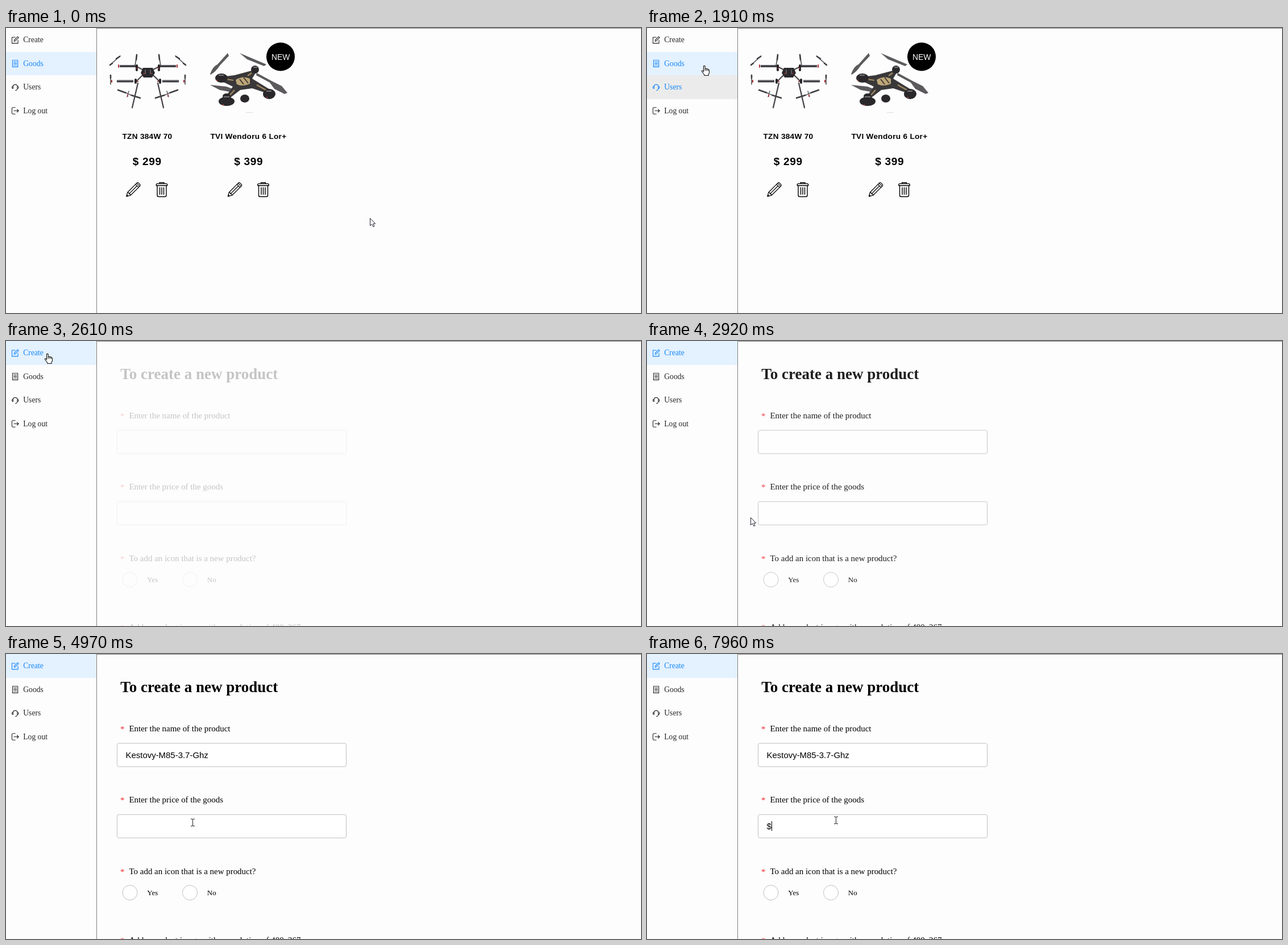
These frames come from a looping animation (1117x501 px, 8 s). An HTML page:

```html
<!DOCTYPE html>
<html lang="en">
<head>
<meta charset="utf-8">
<title>Shop admin</title>
<style>
  html, body { margin: 0; width: 100%; height: 100%; overflow: hidden; background: #fdfdfd; }
  svg { display: block; }
  .serif { font-family: "Liberation Serif", "Times New Roman", serif; }
  .sans { font-family: "Liberation Sans", Arial, sans-serif; }
  .line { fill: none; stroke: currentColor; stroke-linejoin: round; stroke-linecap: round; }
  .field { fill: #fff; stroke: #bfbfbf; }
</style>
</head>
<body>
<svg id="stage" width="1117" height="501" viewBox="0 0 1117 501">
  <defs>
    <g id="pencil" class="line" stroke-width="1.2">
      <path d="M1 26 2.8 19 19.200 2.400Q20.600 1 22 2.400L24.600 5Q26 6.400 24.600 7.800L8 24.200ZM2.800 19Q5.500 18.800 5.400 21.600 8.200 21.500 8 24.200M16.800 4.800 22.200 10.200M18.800 2.800 24.200 8.200M5.400 21.600 19.500 7.500"/>
      <path d="M1 26 1.700 23.300 3.700 25.300Z" fill="currentColor"/>
    </g>
    <path id="trash" class="line" stroke-width="1.4" d="M.8 4.600Q.8 2.600 3 2.600H18Q20.200 2.600 20.200 4.600V6H.8ZM6.500 2.600V.8H14.500V2.600M2.500 6V23Q2.500 25.500 5 25.500H16Q18.500 25.500 18.500 23V6M7 9.500V21.500M10.500 9.500V21.500M14 9.500V21.500"/>
  </defs>

  <g id="menu" class="serif" font-size="13.6"></g>
  <path d="M159.500 0V501M159 .5H1117" fill="none" stroke="#808080"/>

  <g id="goods" class="sans">
    <g id="hexaDrone" fill="none" stroke-linecap="round">
      <g id="droneHalf">
        <path d="M230 68 244 75M230 93 240 83" stroke="#4a484c" stroke-width="2.200"/>
        <path d="M200 67H228M195 93.500H224" stroke="#3a3a40" stroke-width="4" stroke-linecap="butt"/>
        <path d="M200 66H228M195 92.500H224" stroke="#707076"/>
        <path d="M230 48 227 66M201 49 192 57 183 65M184 83V99" stroke="#4d4b50" stroke-width="1.600"/>
        <path d="M230 47 229 56M200 50 194 54M187 62 183 65M184 83V88M197 109 211 114M220 118 236 123" stroke="#3f3e43" stroke-width="2.600"/>
        <path d="M232 97 222 140" stroke="#47454a" stroke-width="2.300"/>
        <path d="M211 114 220 118M213 121 216 111" stroke="#66636a" stroke-width="1.500"/>
        <path d="M230 66V74M228 91V96" stroke="#232326" stroke-width="4"/>
        <path d="M198 65V69M230 71H231M186 92V95M214 118V120M231 94H232" stroke="#a8343a" stroke-width="2"/>
      </g>
      <use href="#droneHalf" transform="matrix(-1 0 0 1 499 0)"/>
      <path d="M241 70H258L262 79 257 87H242L237 79Z" fill="#29292d"/>
      <path d="M245 74V80M254 74V80" stroke="#5d5d64" stroke-width="2"/>
      <path d="M242 80H244M255 80H257" stroke="#a8343a" stroke-width="1.500"/>
    </g>

    <g id="quadDrone">
      <path d="M359 81Q364 67 372 64L390 44 392 49 376 66Q369 77 360 82ZM411 44 425 50 458 64 454 67 424 55ZM359 100 388 103 409 111 404 114 376 109ZM441 79 467 93 485 102 495 114 490 116 472 107 464 96 440 83Z" fill="#5c5a5d"/>
      <path d="M378 86 402 83 432 75 439 79 433 89 464 108 460 115 433 106 412 109 390 126 386 121 399 103 376 92Z" fill="#3a3839"/>
      <path d="M382 89 400 92M432 79 425 84M441 100 459 110M402 109 391 121" stroke="#a28b62" stroke-width="2.200"/>
      <path d="M404 91Q417 83 429 89L429 98Q417 104 406 99Z" fill="#bda77a"/>
      <path d="M411 90 418 99M418 87 426 97" stroke="#413a32" stroke-width="2"/>
      <g fill="#2a282b">
        <ellipse cx="379" cy="88" rx="11" ry="8"/><ellipse cx="438" cy="73" rx="7" ry="7"/>
        <ellipse cx="463" cy="116" rx="11" ry="9"/><ellipse cx="388" cy="129" rx="14" ry="8"/>
        <ellipse cx="388" cy="120" rx="7" ry="5"/><ellipse cx="420" cy="124" rx="8" ry="7"/>
      </g>
      <path d="M374 83H383M458 111H467M383 121H393M435 69H442" stroke="#79757a" stroke-width="2"/>
      <path d="M371 91V93M459 121V123M382 134V136" stroke="#aa3b3c" stroke-width="2"/>
      <path d="M422 148.500H434" stroke="#dedede"/>
    </g>
    <circle cx="483" cy="50.500" r="25"/>
    <text x="467" y="55.500" font-size="13.900" fill="#fff">NEW</text>
    <g font-weight="bold" font-size="13.600" letter-spacing=".3">
      <text x="204.500" y="195">TZN 384W 70</text>
      <text x="359.500" y="195">TVI Wendoru 6 Lor+</text>
    </g>
    <g font-weight="bold" font-size="19" letter-spacing=".7">
      <text x="222.800" y="241">$ 299</text>
      <text x="401.200" y="241">$ 399</text>
    </g>
    <use href="#pencil" x="211" y="270"/><use href="#trash" x="263.500" y="271"/>
    <use href="#pencil" x="389.500" y="270"/><use href="#trash" x="442" y="271"/>
  </g>

  <g id="form">
    <text class="serif" x="201.300" y="66.500" font-size="27" font-weight="bold">To create a new product</text>
    <g id="labels" class="serif" font-size="14.950"></g>
    <rect class="field" x="195.500" y="157" width="403" height="41" rx="3"/>
    <rect class="field" x="195.500" y="282.300" width="403" height="41" rx="3"/>
    <circle class="field" cx="218" cy="419.500" r="13"/>
    <circle class="field" cx="323.500" cy="419.500" r="13"/>
    <g class="serif" font-size="13">
      <text x="248.300" y="423.500">Yes</text><text x="353.800" y="423.500">No</text>
    </g>
    <g class="sans" font-size="14.950">
      <text id="nameText" x="210.500" y="182.500"></text>
      <text id="priceText" x="210.500" y="307.700"></text>
    </g>
    <path id="caret" d="M0 0V17" stroke="#000"/>
  </g>

  <g id="cursors" stroke-linejoin="round">
    <path id="arrow" d="M.5 .5V13.500L3.600 10.800 5.800 15.500 8 14.500 5.800 10H9.700Z" fill="#fff" stroke="#223"/>
    <g id="hand">
      <path d="M-1.500 11V1.500Q-1.500 .4 -.2 .4T1.200 1.500V6.500Q1.200 5.300 2.500 5.300T3.900 6.700Q4 5.800 5.200 5.900T6.500 7.500Q6.800 6.800 7.600 7T8.500 8.500V12Q8.500 14 7 15.500V17.500H-.2V16L-4.500 10.500Q-4.800 9 -3.600 8.800T-1.500 11Z" fill="#fff" stroke="#111" stroke-width="1.100"/>
      <path d="M1.200 6.500V9.500M3.900 6.700V9.500M6.500 7.500V9.500" fill="none" stroke="#111"/>
    </g>
    <path id="beam" d="M-3 -6H-1Q.5 -6 .5 -4.500Q.5 -6 2 -6H4M.5 -5V6M-3 6.500H-1Q.5 6.500 .5 5Q.5 6.500 2 6.500H4" fill="none" stroke="#222"/>
  </g>
</svg>
<script>
const LOOP = 8000, ROW = 41.5;
const $ = id => document.getElementById(id);

const items = [
  ['Create', 'M6.500 1.800H.800V12.400H11.400V7M4.500 8.900 5 6.500 10.800 .7 12.500 2.400 6.700 8.200Z'],
  ['Goods', 'M1.800 .8H11V12.400H1.800ZM4 3.800H9M4 6.400H9M4 9H9'],
  ['Users', 'M2.500 4.600A4.300 4.300 0 0 1 10.500 4.600M2.800 4.800V8.800Q.8 8.800 .8 6.800T2.800 4.800ZM10.200 4.800V8.800Q12.200 8.800 12.200 6.800T10.200 4.800ZM10.200 8.800Q10 12.200 6.800 12.200'],
  ['Log out', 'M6.500 .8H2.500Q.8 .8 .8 2.500V10.500Q.8 12.200 2.500 12.200H6.500M4.500 6.500H12.200M9.800 4 12.400 6.500 9.800 9']
];
$('menu').innerHTML = items.map(([name, icon], i) => `
  <g transform="translate(0 ${i * ROW})">
    <rect width="159" height="${ROW}" shape-rendering="crispEdges"/>
    <path class="line" stroke-width="1.100" transform="translate(9.700 14.500)" d="${icon}"/>
    <text x="30.300" y="25" fill="currentColor">${name}</text>
  </g>`).join('');
const rows = [...$('menu').children];

const labels = [
  ['Enter the name of the product', 136],
  ['Enter the price of the goods', 261.3],
  ['To add an icon that is a new product?', 386.6],
  ['Add a product image with a resolution of 400x267', 507.5]
];
$('labels').innerHTML = labels.map(([label, y]) =>
  `<text x="201" y="${y + 1}" fill="#f5222d">*</text><text x="216.500" y="${y}">${label}</text>`).join('');

// Pointer glides: first step, last step, number of steps, destination.
const start = [640, 334];
const glides = [
  [690, 1380, 6, 234, 157],
  [1780, 1780, 1, 125, 98],
  [1910, 1910, 1, 101, 66],
  [2060, 2200, 2, 73, 22],
  [2620, 2760, 2, 125, 150],
  [2920, 2920, 1, 182, 310],
  [3067, 3950, 7, 343, 182],
  [4535, 4970, 4, 328, 296],
  [5400, 5400, 1, 328, 295.5],
  [5950, 5950, 1, 329, 295],
  [6380, 6790, 3, 332, 293],
  [7090, 7090, 1, 332, 292],
  [7530, 7530, 1, 332, 291],
  [7960, 7960, 1, 332, 292]
];

function pointerAt(t) {
  let [x, y] = start;
  for (const [from, to, steps, endX, endY] of glides) {
    if (t < from) break;
    const gap = (to - from) / (steps - 1 || 1) || 1;
    const k = Math.min(1, (Math.floor((t - from) / gap + 1e-6) + 1) / steps);
    x += (endX - x) * k;
    y += (endY - y) * k;
  }
  return [x, y];
}

const show = (node, on) => node.setAttribute('visibility', on ? 'visible' : 'hidden');
const within = (t, from, to) => t >= from && t < to;

function drawMenu(t, x, y) {
  const active = t < 2330 ? 1 : t < 2480 ? -1 : 0;
  const lingering = within(t, 1910, 2060);
  const hover = lingering ? 2 : x < 159 ? Math.floor(y / ROW) : -1;
  rows.forEach((row, i) => {
    row.firstElementChild.setAttribute('fill', i === active ? '#e4f1ff' : i === hover ? '#ebebeb' : 'none');
    row.style.color = i === active || i === hover ? '#1687f8' : '#262626';
  });
}

function drawForm(t) {
  const fade = t < 2480 ? 0 : Math.min(1, (Math.floor((t - 2480) / 146) + 1) * 0.22);
  show($('goods'), t < 2330);
  $('form').setAttribute('opacity', fade);

  const pasted = t >= 4390, typed = t >= 7820;
  $('nameText').textContent = pasted ? 'Kestovy-M85-3.7-Ghz' : '';
  $('priceText').textContent = typed ? '$' : '';

  const inName = within(t, 4240, 4970);
  const inPrice = within(t, 5400, 5800) || within(t, 6380, 7090) || t >= 7530;
  const caretX = inName && pasted ? 356.5 : typed ? 219.5 : 211.5;
  $('caret').setAttribute('transform', `translate(${caretX} ${inName ? 169 : 294})`);
  show($('caret'), inName || inPrice);
}

function drawPointer(t, x, y) {
  const overField = t > 2480 && x > 195 && (within(y, 157, 198) || within(y, 282, 323));
  const kind = x < 159 ? 'hand' : overField ? 'beam' : 'arrow';
  for (const id of ['arrow', 'hand', 'beam']) show($(id), id === kind);
  $('cursors').setAttribute('transform', `translate(${Math.round(x)} ${Math.round(y)})`);
}

function draw(t) {
  const [x, y] = pointerAt(t);
  drawMenu(t, x, y);
  drawForm(t);
  drawPointer(t, x, y);
}

const began = performance.now();
function tick() {
  draw((performance.now() - began) % LOOP);
  requestAnimationFrame(tick);
}
tick();
</script>
</body>
</html>
```
